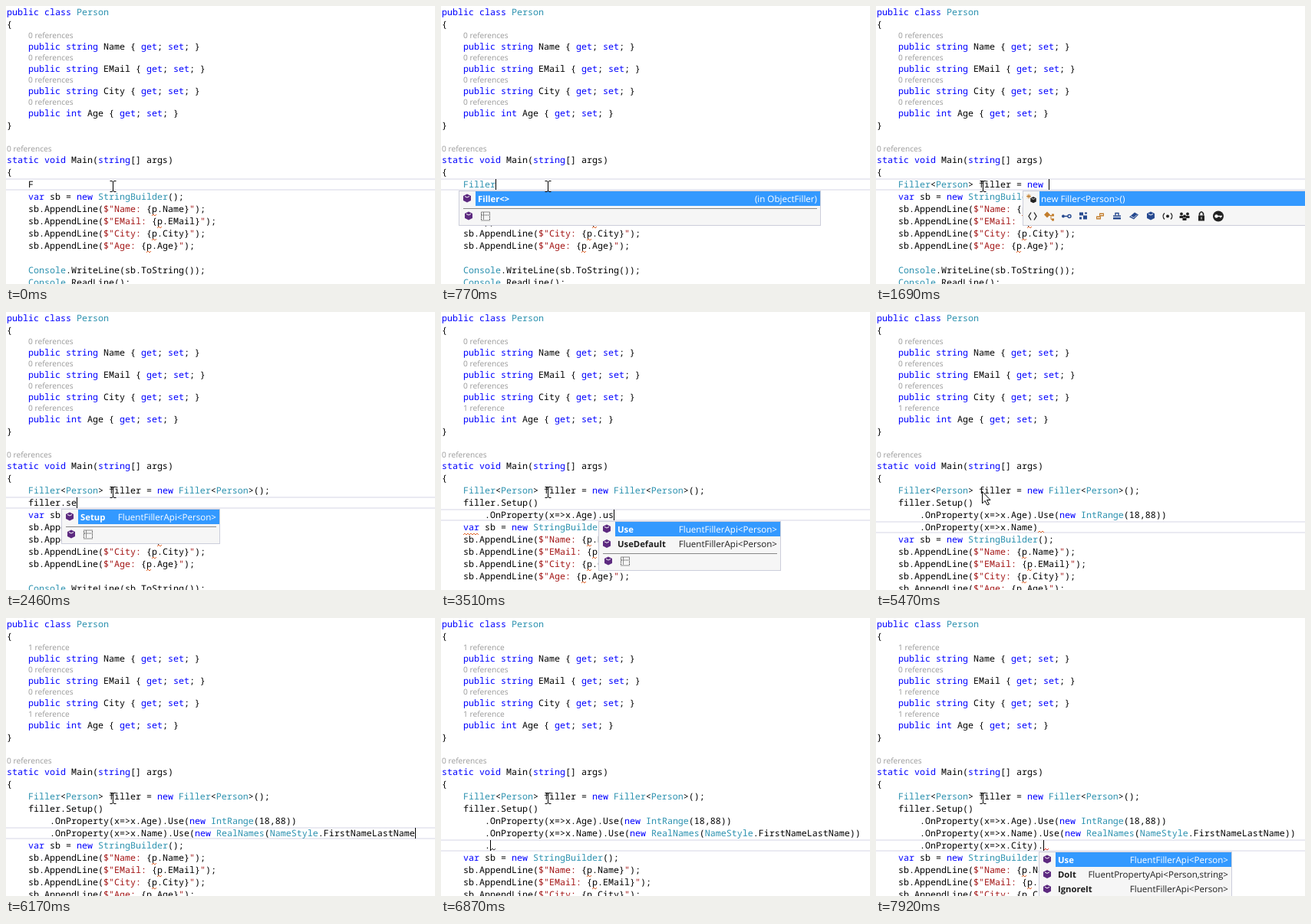
Animation of 559x363 px, one loop 7990 ms. Source, as an HTML page:

```html
<!DOCTYPE html>
<html lang="en">
<head>
<meta charset="utf-8">
<title>Typing code</title>
<style>
html, body { margin: 0; width: 100%; height: 100%; overflow: hidden; background: #fff; }
svg { display: block; }
text { white-space: pre; text-rendering: geometricPrecision; }
.code { font: 11.667px "Noto Sans Mono", monospace; }
.ref { font: 10.2px "Open Sans", sans-serif; fill: #999; }
.item { font: 11.6px "Open Sans", sans-serif; }
.bold { font-weight: 700; font-size: 11.3px; }
</style>
</head>
<body>
<svg id="stage" width="559" height="363" viewBox="0 0 559 363"></svg>
<script>
const LOOP = 7990, TICK = 70, CW = 7, LINE = 16, EDIT_TOP = 225;
const BLUE = '#0000ff', TEAL = '#2b91af', RED = '#a31515';
const stage = document.getElementById('stage');

const keywords = /^(public|class|string|int|get|set|static|void|var|new)$/;
const types = /^(Person|Filler|StringBuilder|Console|IntRange|RealNames|NameStyle)$/;

// [tick, typed text, popup]; "\n" opens a line, "~" completes the current word
const steps = [
  [0, 'F'], [1, 'i', 'type'], [3, 'l', 'type'], [5, 'l', 'type'], [7, 'e', 'type'], [9, 'r', 'type'], [12, ''],
  [13, '<'], [14, 'P', 'person'], [15, 'e', 'person'], [16, '~Person'], [17, '>'], [18, ' '],
  [19, 'f', 'filler'], [20, '~filler'], [21, ' ='], [22, ' n'], [23, 'ew'], [24, ' ', 'create'],
  [25, 'Filler<Person>()'], [26, ';'], [27, '\n'], [28, 'f', 'filler'],
  [30, 'i', 'filler'], [31, '~filler'], [32, '.'], [33, '', 'setup'], [34, 's', 'setup'], [35, 'e', 'setup'],
  [36, '~Setup'], [37, '()'], [38, '\n'], [40, '.', 'on'], [41, 'O', 'on'],
  [42, 'n', 'on'], [43, '~OnProperty'], [44, '(x'], [45, '=>'], [46, 'x.', 'props'], [47, 'A', 'age'],
  [48, '~Age'], [49, ').', 'use'], [50, 'us', 'use'], [51, '~Use'], [52, '('], [53, 'ne'],
  [54, 'w '], [55, 'Int', 'range'], [57, '~IntRange'], [58, '('], [59, '18'], [60, ','], [61, '88'], [62, '))'], [63, '\n'],
  [65, '.', 'on'], [66, 'On', 'on'], [67, '~OnProperty'], [68, '('], [70, 'x=>'],
  [72, 'x'], [73, '.', 'props'], [74, 'N', 'name'], [76, '~Name'], [77, ')'],
  [79, '.', 'members'], [80, 'u', 'use'], [81, '~Use'], [82, '('], [83, 'new '],
  [84, 'Re', 'real'], [85, '~RealNames'], [86, '('], [87, 'Na', 'style'], [88, '~NameStyle.FirstNameLastName'], [89, '))'],
  [91, '\n'], [97, '.'], [99, 'O', 'on'], [100, '~OnProperty'], [101, '('], [102, 'x'],
  [103, '=>'], [104, 'x'], [105, '.', 'props'], [106, 'C', 'city'], [108, '~City'], [109, ')'], [111, '.'], [112, '', 'members']
];

const api = 'FluentFillerApi<Person>', propApi = 'FluentPropertyApi<Person,string>';
const props = { Age: 'int', City: 'string', EMail: 'string', Name: 'string' };
const prop = key => ({ w: 150, rows: [[key, props[key]]] });
const popups = {
  type: { w: 472, rows: [['Filler<>', '(in ObjectFiller)']] },
  person: { w: 180, rows: [['Person', 'class']] },
  filler: { w: 207, rows: [['filler', 'Filler<Person>']] },
  create: { w: 380, rows: [['new Filler<Person>()', '']], full: true },
  setup: { w: 207, rows: [['Setup', api]] },
  on: { w: 272, rows: [['OnProperty', propApi], ['OnType', api]] },
  props: { w: 150, rows: Object.entries(props) },
  age: prop('Age'), name: prop('Name'), city: prop('City'),
  use: { w: 238, rows: [['Use', api], ['UseDefault', api]] },
  members: { w: 252, rows: [['Use', api], ['DoIt', propApi], ['IgnoreIt', api]] },
  range: { w: 190, rows: [['IntRange', 'class']] },
  real: { w: 190, rows: [['RealNames', 'class']] },
  style: { w: 190, rows: [['NameStyle', 'enum']] }
};

const esc = s => s.replace(/&/g, '&amp;').replace(/</g, '&lt;');
const colX = col => 1 + col * CW;
const rect = (x, y, w, h, fill, more = '') => `<rect x="${x}" y="${y}" width="${w}" height="${h}" fill="${fill}" ${more}/>`;
const stroke = (d, color, w = 1) => `<path d="${d}" fill="none" stroke="${color}" stroke-width="${w}"/>`;
const fill = (d, color) => `<path d="${d}" fill="${color}"/>`;
const dot = (x, y, r, color) => `<circle cx="${x}" cy="${y}" r="${r}" fill="${color}"/>`;
const at = (x, y, body) => `<g transform="translate(${x} ${y})">${body}</g>`;
const ref = (x, y, n) => `<text class="ref" x="${x}" y="${y}">${n} reference${n ? '' : 's'}</text>`;

function code(col, y, src) {
  const parts = src.match(/\$"[^{]*|"|\w+|[^\w"$]+/g) || [];
  const spans = parts.map(p => {
    const c = keywords.test(p) ? BLUE : types.test(p) ? TEAL : p.includes('"') ? RED : '#000';
    return `<tspan fill="${c}">${esc(p)}</tspan>`;
  });
  return `<text class="code" x="${colX(col)}" y="${y}">${spans.join('')}</text>`;
}

function squiggle(x, y, w, color) {
  let d = `M${x} ${y + 2}`;
  for (let i = 2; i <= w; i += 2) d += `l2 ${i % 4 ? -2 : 2}`;
  return stroke(d, color);
}

const cube = c => fill('M0-6L5-3.5V2.5L0 5-5 2.5V-3.5Z', c) + stroke('M-3-3L0-1.5 3-3', '#fff');
const boxes = c => rect(-5, -5, 5, 4, c) + rect(0, -1, 5, 5, c) + rect(-5, 1, 3, 3, c) + rect(2, -5, 3, 2, c);
const NAVY = '#26498f', GOLD = '#c27d2c', INK = '#222';
const dashed = stroke('M-5.5-5.5H5.5V5.5H-5.5Z', INK, '1" stroke-dasharray="1 1') +
  stroke('M-2.5-5V5M-5-1.5H5', INK, '1" stroke-dasharray="1 1');
const toolIcons = [
  stroke('M-2-5L-5 0-2 5M2-5L5 0 2 5', INK, 1.3),
  fill('M-3-6L1-2-3 2-7-2Z', GOLD) + stroke('M0-1H5M2-1V4H5', GOLD) + rect(3, -3, 3, 3, GOLD) + rect(3, 3, 3, 3, GOLD),
  stroke('M-2 0H2', NAVY, 1.5) + dot(-4, 0, 2, NAVY) + `<circle cx="4" cy="0" r="2" fill="#fff" stroke="${NAVY}" stroke-width="1.4"/>`,
  boxes(NAVY),
  rect(-1, -4, 6, 4, GOLD) + rect(-5, 0, 6, 4, GOLD) + stroke('M0-2H4M-4 2H0', '#fff'),
  rect(-5, -1, 10, 5, NAVY) + stroke('M-2-1V-4H2V-1', NAVY, 1.4) + stroke('M-5 1H5', '#fff'),
  fill('M1-5L6-2 0 4-6 1Z', NAVY) + stroke('M-4 0L0 2 4-2', '#fff', 0.8),
  cube(NAVY),
  stroke('M-4-4Q-8 0-4 4M4-4Q8 0 4 4', INK, 1.2) + dot(0, 0, 2, INK),
  [[-4, -3], [4, -3], [0, 0]].map(([x, y]) => dot(x, y, 1.9, INK) + rect(x - 2.5, y + 2.5, 5, 3, INK)).join(''),
  rect(-4, -1, 8, 7, INK) + stroke('M-2.5-1V-3.5Q0-8 2.5-3.5V-1', INK, 1.6) + rect(-0.5, 1, 1, 3, '#fff'),
  dot(0, 0, 7, INK) + dot(-2.5, 0, 2.2, '#fff') + stroke('M-1 0H5M3 0V2', '#fff', 1.4)
];
const purple = cube('#5d2a80');
const sparkBox = stroke('M-4-6V0M-7-3H-1M-6-5L-2-1M-6-1L-2-5', GOLD) + at(2, 2, `<g transform="scale(.75)">${cube(INK)}</g>`);

function popup({ w, rows, full }, x, y) {
  const end = y + 1 + rows.length * 19;
  let out = rect(x + 0.5, y + 0.5, w - 1, end - y + 25, '#f6f6f6', 'stroke="#cccedb"');
  rows.forEach(([name, type], i) => {
    const top = y + 1 + i * 19.4, ink = i ? '#1e1e1e' : '#fff', base = top + 13.5;
    if (!i) out += rect(x + 22, top, w - 23, 19, '#3399ff');
    out += at(x + (full ? 12 : 11), top + 9.5, full ? sparkBox : purple);
    out += `<text class="item ${full ? '' : 'bold'}" x="${x + (full ? 24 : 25)}" y="${base}" fill="${ink}">${esc(name)}</text>`;
    out += `<text class="item" x="${x + w - 5}" y="${base}" text-anchor="end" fill="${ink}">${esc(type)}</text>`;
  });
  if (!full) out += stroke(`M${x + 6} ${end + 3.5}H${x + w - 5}`, '#888');
  (full ? toolIcons : [purple, dashed]).forEach((icon, i) => { out += at(x + 13 + i * 22, end + 13.5, icon); });
  return out;
}

const ibeam = stroke('M135.5 228.5H138L139.5 229.5 141 228.5H143.5M139.5 229.5V241.5M135.5 242.5H138L139.5 241.5 141 242.5H143.5', '#000');
const arrow = '<path d="M138.5 234.5V250L142 246.5 145 252 147.5 251 144.5 245.5H149Z" fill="#fff" stroke="#000"/>';

function typed(n) {
  const lines = [''];
  let menu;
  for (const [tick, s, p] of steps) {
    if (tick > n) break;
    const last = lines.length - 1;
    if (s === '\n') lines.push('');
    else if (s[0] === '~') lines[last] = lines[last].replace(/\w*$/, s.slice(1));
    else lines[last] += s;
    menu = p;
  }
  return { lines, menu };
}

function draw(n) {
  const { lines, menu } = typed(n);
  const last = lines.length - 1, top = EDIT_TOP + last * LINE;
  const indent = row => row < 2 ? 4 : 8;
  const caretX = colX(indent(last) + lines[last].length);

  let out = rect(0, top, 559, 2, '#eaeaf2') + rect(0, top + 14, 559, 2, '#eaeaf2');
  out += code(0, 12, 'public class Person') + code(0, 28, '{');
  [['string Name', n >= 81], ['string EMail', false], ['string City', n >= 110], ['int Age', n >= 48]].forEach(([decl, used], i) => {
    out += ref(29, 42 + i * 29, +used) + code(4, 57 + i * 29, `public ${decl} { get; set; }`);
  });
  out += code(0, 160, '}') + ref(1, 190, 0) + code(0, 205, 'static void Main(string[] args)') + code(0, 221, '{');

  lines.forEach((s, i) => { out += code(indent(i), EDIT_TOP + 12 + i * LINE, s); });

  let y = top + LINE + 12;
  out += code(4, y, 'var sb = new StringBuilder();');
  if (n >= 44 && n < 54) out += squiggle(29, y + 4, 20, '#e0662e');
  for (const key of ['Name', 'EMail', 'City', 'Age']) {
    y += LINE;
    out += code(4, y, `sb.AppendLine($"${key}: {p.${key}}");`);
    out += squiggle(colX(23 + key.length), y + 3, 6, '#e0662e');
  }
  out += code(4, y + 2 * LINE, 'Console.WriteLine(sb.ToString());') + code(4, y + 3 * LINE, 'Console.ReadLine();');

  if (n >= 77 && n < 79) out += squiggle(caretX, top + 13, 8, '#e0662e');
  if (n >= 97 && n < 99) out += squiggle(caretX + 1, top + 12, 6, '#333');
  if (n >= 111) out += squiggle(caretX + 1, top + 12, 6, '#e03020');
  if (n > 0 && (n < 76 || n > 78)) out += rect(caretX, top + 1, 1, 14, '#000');

  if (menu) {
    const word = lines[last].search(/\w* ?$/);
    out += popup(popups[menu], colX(indent(last) + word) - 6, top + LINE);
  }
  stage.innerHTML = out + (n >= 76 && n < 80 ? arrow : ibeam);
}

let shown = -1;
function frame() {
  const n = Math.min(113, Math.floor(performance.now() % LOOP / TICK));
  if (n !== shown) draw(shown = n);
  requestAnimationFrame(frame);
}
frame();
</script>
</body>
</html>
```
